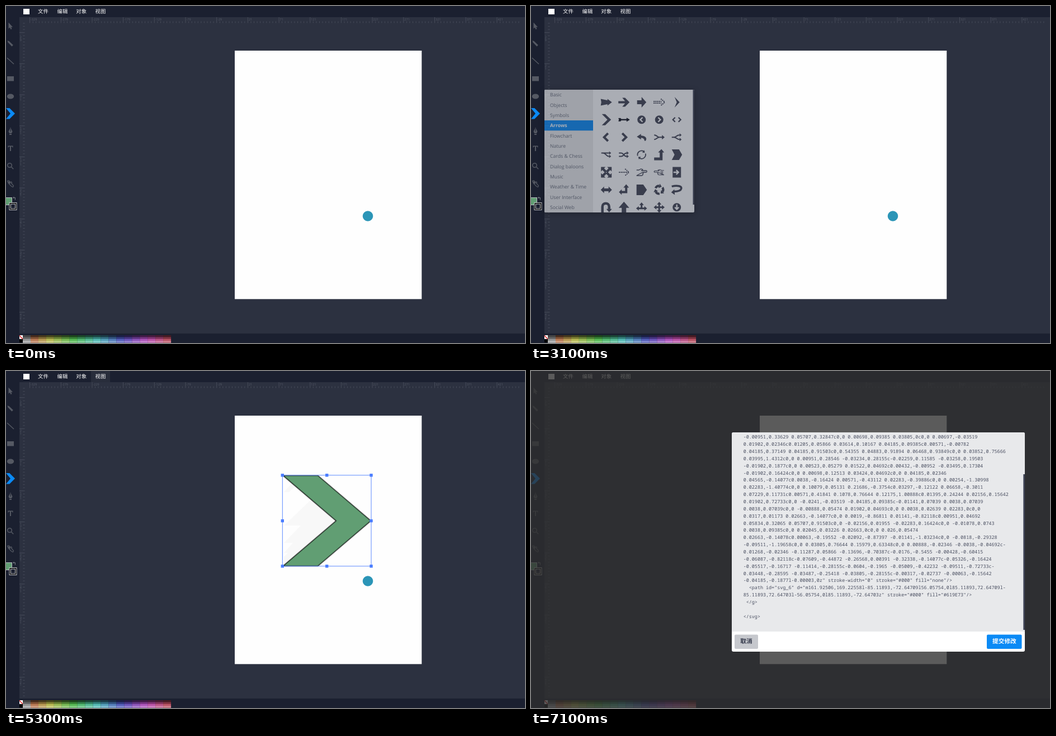
Recreate the animation shown at these times as an HTML page. Size 928 px wide and 604 px high, loop 8000 ms.

```html
<!DOCTYPE html>
<html lang="zh">
<head>
<meta charset="utf-8">
<title>Vector editor</title>
<style>
html, body { margin: 0; width: 100%; height: 100%; overflow: hidden; background: #1b2030; }
svg { display: block; width: 928px; height: 604px; }
text { font-family: "Open Sans", "Noto Sans", "Noto Sans CJK SC", "Noto Sans CJK", sans-serif; text-rendering: geometricPrecision; white-space: pre; }
.cjk { font-family: "Noto Sans CJK SC", "Noto Sans CJK", sans-serif; }
.code { font: 8.415px "Noto Sans Mono", "DejaVu Sans Mono", monospace; fill: #4a4f61; }
.tick { stroke: #4e5361; stroke-width: .8; fill: none; }
.mark { font-size: 5.5px; fill: #565b68; }
.cat { font-size: 8.7px; fill: #656b79; }
.tool { fill: #555963; }
.icon { color: #414555; stroke-width: 0; }
.key { font-size: 7.5px; font-weight: 600; fill: #4a5063; }
.row { font-size: 9.2px; fill: #5c6271; }

.a { animation: 8s step-end infinite; }
.panel { filter: drop-shadow(0 2px 6px rgba(0,0,0,.45)); animation-name: panel; }
.cat.h1 { animation-name: cat1; }
.cat.h2 { animation-name: cat2; }
.icon.h0 { animation-name: icon0; }
.icon.h5 { animation-name: icon5; }
.icon.h6 { animation-name: icon6; }
.shape { fill: #619e73; stroke: #000; stroke-width: 1.2; vector-effect: non-scaling-stroke; animation-name: drag; }
.trace { animation-name: trace; }
.select { animation-name: select; }
.hover { animation-name: hover; }
.menu { filter: drop-shadow(0 2px 4px rgba(0,0,0,.35)); animation-name: menu; }
.row.r0 { animation-name: row0; }
.row.r2 { animation-name: row2; }
.badge.r2 { animation-name: badge2; }
.badge.r0 { animation-name: badge0; }
.modal { animation-name: modal; }

@keyframes panel {
  0% { opacity: 0 } 17.5% { opacity: 1 } 37.5% { opacity: .925 }
  38.75% { opacity: .62 } 40% { opacity: .24 } 41.25%, 100% { opacity: 0 }
}
@keyframes cat2 { 21.25% { fill: #2b3040 } 22.5%, 100% { fill: #656b79 } }
@keyframes cat1 { 22.5% { fill: #2b3040 } 23.75%, 100% { fill: #656b79 } }
@keyframes icon0 { 23.75% { color: #10131f; stroke-width: .8px } 25%, 100% { color: #414555; stroke-width: 0 } }
@keyframes icon5 { 31.25% { color: #10131f; stroke-width: .8px } 32.5%, 100% { color: #414555; stroke-width: 0 } }
@keyframes icon6 { 32.5% { color: #10131f; stroke-width: .8px } 45%, 100% { color: #414555; stroke-width: 0 } }
@keyframes drag {
  0% { visibility: hidden; transform: translate(495.5px,187.5px) scale(1,1) }
  42.5% { visibility: visible; transform: translate(495.5px,187.5px) scale(38,30) }
  43.75% { transform: translate(495.5px,187.5px) scale(80,90) }
  45% { transform: translate(495.5px,187.5px) scale(104,121) }
  46.25% { transform: translate(495.5px,187.5px) scale(119,140) }
  47.5% { transform: translate(495.5px,187.5px) scale(128,149) }
  48.75% { transform: translate(495.5px,187.5px) scale(139,155) }
  50% { transform: translate(495.5px,187.5px) scale(146,159) }
  51.25% { transform: translate(495.5px,187.5px) scale(151,162) }
  53.75% { transform: translate(495.5px,187.5px) scale(155,162) }
  55%, 100% { visibility: visible; transform: translate(495.5px,187.5px) scale(157,162) }
}
@keyframes trace { 0% { opacity: 0 } 51.25%, 100% { opacity: 1 } }
@keyframes select { 0% { opacity: 0 } 58.75%, 100% { opacity: 1 } }
@keyframes hover { 0% { opacity: 0 } 66.25% { opacity: 1 } 78.75%, 100% { opacity: 0 } }
@keyframes menu { 0% { opacity: 0 } 78.75% { opacity: 1 } 86.25%, 100% { opacity: 0 } }
@keyframes row0 { 81.25% { fill: #10131f } 82.5%, 100% { fill: #5c6271 } }
@keyframes badge0 { 81.25% { fill: #bccdfa } 82.5%, 100% { fill: #dfe3e9 } }
@keyframes row2 { 0% { fill: #5c6271 } 82.5%, 100% { fill: #2b3040 } }
@keyframes badge2 { 0% { fill: #dfe3e9 } 82.5%, 100% { fill: #bccdfa } }
@keyframes modal { 0% { opacity: 0 } 86.25% { opacity: .3 } 87.5% { opacity: .7 } 88.75%, 100% { opacity: 1 } }
</style>
</head>
<body>
<svg id="stage" viewBox="0 0 928 604"></svg>
<script>
const range = n => [...Array(n).keys()];
const rect = (x, y, w, h, fill, more = '') => `<rect x="${x}" y="${y}" width="${w}" height="${h}" fill="${fill}" ${more}/>`;
const text = (x, y, str, more = '') => `<text x="${x}" y="${y}" ${more}>${str.replace(/&/g, '&amp;').replace(/</g, '&lt;')}</text>`;
const path = (d, more = '') => `<path d="${d}" ${more}/>`;
const group = (cls, body) => `<g class="${cls}">${body}</g>`;

// Rulers: 50 units are 55.7 px, the page starts at 409,80
const unit = 1.1137;
function rulers() {
  let ticks = '', labels = '';
  for (let v = -329; v < 460; v += 5) {
    const x = (409 + v * unit).toFixed(1), major = (v + 329) % 50 === 0;
    if (x < 928) ticks += `M${x} ${major ? 20 : 27.5}V30.5`;
    if (major && x < 900) labels += text(+x + 1.5, 25.5, String(v), 'class="mark"');
  }
  for (let v = -44; v < 455; v += 5) {
    const y = (80 + v * unit).toFixed(1), major = (v + 29) % 50 === 0;
    if (y > 30 && y < 584) ticks += `M${major ? 24 : 30.5} ${y}H33.5`;
    if (major) [...String(v)].forEach((c, i) => labels += text(24.8, +y + 6 + i * 4.6, c, 'class="mark"'));
  }
  return path(ticks, 'class="tick"') + labels;
}

function palette() {
  const light = [19, 36, 54, 68], grey = [27, 40, 60, 75];
  let out = rect(24, 590, 6, 7, '#fff') + path('M24 590.5L30 597', 'stroke="#d22" stroke-width="1.4"') + rect(24, 597, 6, 6, '#000');
  for (const r of range(4)) for (const c of range(19)) {
    const color = c ? `hsl(${22 + (c - 1) * 19.3} ${r > 2 ? 52 : 44}% ${light[r]}%)` : `hsl(0 0% ${grey[r]}%)`;
    out += rect(30 + c * 13.95, 590 + r * 3.4, 14, 3.5, color);
  }
  return out;
}

function toolbar() {
  const line = 'fill="none" stroke="#555963" stroke-width="1.5"';
  return group('tool',
    path('M4.500 29.500V40.500L7 38.500 8.500 42 10.500 41 9 37.800H12Z') +
    path('M2.500 62L5.500 63 12.800 70 10.500 72.500 3.500 65.300Z') +
    path('M2 93L14 104', line) + rect(2, 126, 12, 8.5, '#555963') +
    '<ellipse cx="8" cy="162" rx="6.200" ry="4.600"/>' +
    path('M8 217.500L11.500 225 10 228H6L4.500 225ZM6 229H10V231H6Z') +
    path('M8 219V225', 'stroke="#1b2030"') +
    path('M3.500 250.500H12.500V253.500H11.500L11 252H9V260H7V252H5L4.500 253.500H3.500Z') +
    '<circle cx="6.500" cy="285.500" r="3.800" ' + line + '/>' + path('M9.300 288.300L13.300 292.300', line) +
    path('M2.500 313.500L5 312.800 8 315.800 9.500 315 10.500 316.500 9.500 317.500 13.500 322 12.500 324.500 10 323.500 4.500 318Z', line.replace('1.5', '1.2')) +
    path('M4.500 315L7.500 318', 'stroke="#555963" stroke-width="3"')) +
    path('M0 183H6.300L16 192.700 6.300 202.500H0L8 192.700Z', 'fill="#0b8af5"') +
    rect(-1, 343.5, 11.5, 13, '#619e73', 'stroke="#b9bcc2"') +
    rect(6, 352.5, 13, 13, '#000', 'stroke="#c4c6cb"') + rect(8.5, 355, 8, 8, '#1b2030', 'stroke="#c4c6cb"') +
    path('M13 343.500H16.500V347.500M14.500 342L12.500 343.500 14.500 345', 'fill="none" stroke="#777b85"');
}

// Arrow icons, each about 20 px wide around its own centre
const fill = d => path(d, 'fill="currentColor" stroke="currentColor"');
const stroke = (d, w = 2, more = '') => path(d, `fill="none" stroke="currentColor" style="stroke-width:${w}px" ${more}`);
const cut = d => path(d, 'fill="none" stroke="#f8f9fc" style="stroke-width:2.3px"');
const head = (x, y, turn = 0, s = 4) => `<g transform="translate(${x} ${y}) rotate(${turn})">${fill(`M0 ${-s}L${s * 1.2} 0 0 ${s}Z`)}</g>`;
const spin = (turns, body) => turns.map(a => `<g transform="rotate(${a})">${body}</g>`).join('');
const disc = r => `<circle r="${r}" fill="currentColor"/>`;
const dots = 'stroke-dasharray="2 1.2"';
const corner = 'M-9 5H1V-4H-2L4 -10 9 -4H6V10H-9Z';
const hand = stroke('M-9 -4H-5L-1 -6 2 -5 0 -3H8C10 -3 10 0 8 0H2M2 0C4 1 3 3 2 3 3 4 2 6 0 6H-9Z', 1.3);
const icons = [
  fill('M-10 -6L2 -3.500V-6L10 0 2 6V3.500L-10 6 -9 0Z'),
  fill('M-10 -2H2L-3 -8H2L10 0 2 8H-3L2 2H-10Z'),
  fill('M-8 -3.500H0V-9.500L8.500 0 0 9.500V3.500H-8Z'),
  stroke('M-10 -1.500H4M-10 1.500H4M3 -6L10 0 3 6', 2, dots),
  fill('M-4 -9.500L5 0 -4 9.500 0 0Z'),
  fill('M-8 -10H-2L8.500 0 -2 10H-8L2 0Z'),
  fill('M-9.500 -2.500H-6L-5 -.8H5V-3L10 0 5 3V.8H-5L-6 2.500H-9.500L-8.500 0Z'),
  disc(7.5) + cut('M1.800 -4L-2.200 0 1.800 4'),
  disc(7.5) + cut('M-1.800 -4L2.200 0 -1.800 4'),
  stroke('M-3 -4L-7 0 -3 4M3 -4L7 0 3 4', 2.2),
  stroke('M3 -7L-4 0 3 7', 4),
  stroke('M-3 -7L4 0 -3 7', 4),
  fill('M-8.500 -1L-1 -6V-3C6 -3 10 1 8 5 7 7 5 7 5 5 4 2 2 1 -1 1V4Z'),
  stroke('M-9 -4C-4 -4 -4 0 0 0H6M-9 4C-4 4 -4 0 0 0') + head(5, 0),
  stroke('M-9 0H-5C0 0 -1 -4 5 -4M-5 0C0 0 -1 4 5 4') + head(5, -4, 0, 3) + head(5, 4, 0, 3),
  stroke('M-9 -3H5M-6 -3C0 -3 -1 3 5 3') + head(5, -3, 0, 3) + head(5, 3, 0, 3),
  stroke('M-9 -3H-5C0 -3 -1 3 5 3M-9 3H-5C0 3 -1 -3 5 -3') + head(5, -3, 0, 3) + head(5, 3, 0, 3),
  spin([0, 180], stroke('M-7 2A7.300 7.300 0 0 1 4 -6', 1.8) + head(3, -6, 35, 3)),
  fill(corner),
  fill('M-9 -9.500H4L9.500 0 4 9.500H-9L-4 0Z'),
  spin([0, 90, 180, 270], fill('M-9.500 -9.500H-1.500L-4 -7 1 -2 -2 1 -7 -4 -9.500 -1.500Z')),
  stroke('M-9 0H8M2 -6L9 0 2 6', 1.8, dots),
  hand,
  `<g transform="scale(-.95 .8)">${hand}</g>` + stroke('M2 -1H7M3 1H7M3 3H7', 1),
  fill('M-7.500 -9.500H7.500V9.500H-7.500Z') + cut('M-6 0H2M-1 -4L3 0 -1 4'),
  fill('M-10 0L-4 -6V-2.500H4V-6L10 0 4 6V2.500H-4V6Z'),
  fill('M-9 4L-4 -1V2H2V-4H-1L4 -10 9 -4H6V6H-4V9Z'),
  fill('M-9 -9.500H3L9.500 0 3 9.500H-9Z'),
  spin([0, 120, 240], stroke('M-6.500 -3A7.200 7.200 0 0 1 0 -7.200', 4) + head(0, -7, 18, 4)),
  stroke('M-9 -6C2 -9 9 -6 8 -2 7 2 0 3 -5 3', 3.5) + head(-4, 4, 175, 5),
  stroke('M-7 10V-1C-7 -9 5 -9 5 -1V4', 4.5) + head(5, 3, 90, 5),
  fill('M-9.500 1L0 -10 9.500 1H4V11H-4V1Z'),
  stroke('M-6 2H6M0 2V-5', 3) + head(-5, 2, 180, 4) + head(5, 2, 0, 4) + head(0, -4, -90, 4),
  spin([0, 90, 180, 270], stroke('M0 0H6', 3) + head(5, 0)),
  disc(7.5) + cut('M0 -5V2M-3.500 0L0 3.500 3.500 0')
];

const cats = ['Basic', 'Objects', 'Symbols', 'Arrows', 'Flowchart', 'Nature', 'Cards & Chess', 'Dialog baloons',
  'Music', 'Weather & Time', 'User Interface', 'Social Web'];

function panel() {
  const list = cats.map((name, i) => {
    const y = 162.4 + i * 18.34;
    return i === 3
      ? rect(24, 205, 87, 18.3, '#0b8af5') + text(34, y, name, 'class="cat" style="fill:#fff;font-weight:700"')
      : text(34, y, name, `class="cat a h${i}"`);
  }).join('');
  const grid = icons.map((body, i) =>
    `<g transform="translate(${134.7 + i % 5 * 31.5} ${172.4 + Math.floor(i / 5) * 31.4})"><g class="icon a h${i}">${body}</g></g>`).join('');
  return group('panel a', '<clipPath id="frame"><rect x="24" y="150" width="268" height="220" rx="2"/></clipPath><g clip-path="url(#frame)">' +
    rect(24, 150, 268, 220, '#f8f9fc') + rect(24, 150, 87, 220, '#e6e8ea') + list + grid +
    rect(289.5, 150, 2.5, 206, '#3f4456') + '</g>');
}

function drawing() {
  const handles = [494.3, 573.7, 653].flatMap(x => [186.8, 268.5, 349.8].map(y => [x, y]))
    .filter(([x, y]) => x !== 573.7 || y !== 268.5)
    .map(([x, y]) => rect(x - 2.7, y - 2.7, 5.4, 5.4, '#4a7dff')).join('');
  return path('M497 217H506L517 207 511 201ZM545 231L497 277H527L497 308H513L497 326H504L497 333V348L589 268.500Z', 'class="trace a" fill="#f8f8f8"') +
    path('M0 0H.397L1 .5 .397 1H0L.603 .5Z', 'class="shape a"') +
    group('select a', rect(494.3, 186.8, 158.7, 163, 'none', 'stroke="#4a7dff" stroke-width=".9"') + handles);
}

const title = (x, str, color = '#fff') => text(x, 13.4, str, `class="cjk" font-size="9.400" font-weight="500" fill="${color}"`);

function menu() {
  return group('hover a', rect(152, 0, 34, 20, '#282d3b') + title(159.6, '视图')) +
    group('menu a',
      path('M152 0H186V20H268.500Q272.500 20 272.500 24V95.500Q272.500 99.500 268.500 99.500H156Q152 99.500 152 95.500Z', 'fill="#f8f9fc"') +
      title(159.6, '视图', '#656b79') +
      rect(152, 70, 120.5, .8, '#e1e3e7') +
      text(155.5, 39.5, '✓', 'class="row" style="font-family:\'DejaVu Sans\',sans-serif;fill:#2b3040"') +
      text(167.5, 39.5, '显示刻度尺', 'class="row a r0"') +
      rect(247, 28, 20, 16, '#dfe3e9', 'rx="2" class="badge a r0"') +
      text(252, 39, '⇧R', 'class="key" style="font-family:\'Open Sans\',\'DejaVu Sans\',sans-serif"') +
      text(167.5, 60.3, '显示 Wireframe', 'class="row"') +
      text(167.5, 87.3, '源代码...', 'class="row a r2"') +
      rect(233, 76, 34, 16, '#dfe3e9', 'rx="2" class="badge a r2"') +
      text(238, 87, 'Ctrl+U', 'class="key" style="fill:#2b3040"'));
}

const code = `-0.00951,0.33629 0.05707,0.32847c0,0 0.00698,0.09385 0.03805,0c0,0 0.00697,-0.03519
0.01902,0.02346c0.01205,0.05866 0.03614,0.10167 0.04185,0.09385c0.00571,-0.00782
0.04185,0.37149 0.04185,0.91503c0,0.54355 0.04883,0.91894 0.06468,0.93849c0,0 0.03852,0.75666
0.03995,1.4312c0,0 0.00951,0.28546 -0.03234,0.28155c-0.02259,0.11585 -0.03258,0.19503
-0.01902,0.1877c0,0 0.00523,0.05279 0.01522,0.04692c0.00432,-0.00952 -0.03495,0.17304
-0.01902,0.16424c0,0 0.00698,0.12513 0.03424,0.04692c0,0 0.04185,0.02346
0.04565,-0.14077c0.0038,-0.16424 0.00571,-0.43112 0.02283,-0.39886c0,0 0.00254,-1.30998
0.02283,-1.40774c0,0 0.10079,0.05131 0.21686,-0.3754c0.03297,-0.12122 0.06658,-0.3011
0.07229,0.11731c0.00571,0.41841 0.1078,0.76644 0.12175,1.00888c0.01395,0.24244 0.02156,0.15642
0.01902,0.72733c0,0 -0.0241,-0.03519 -0.04185,0.09385c-0.01141,0.07039 0.0038,0.07039
0.0038,0.07039c0,0 -0.00888,0.05474 0.01902,0.04693c0,0 0.0038,0.02639 0.02283,0c0,0
0.0317,0.01173 0.02663,-0.14077c0,0 0.0019,-0.86811 0.01141,-0.82118c0.00951,0.04692
0.05834,0.32065 0.05707,0.91503c0,0 -0.02156,0.01955 -0.02283,0.16424c0,0 -0.01078,0.0743
0.0038,0.09385c0,0 0.02045,0.03226 0.02663,0c0,0 0.026,0.05474
0.02663,-0.14078c0.00063,-0.19552 -0.02092,-0.87397 -0.01141,-1.03234c0,0 -0.0818,-0.29328
-0.09511,-1.19658c0,0 0.03805,0.76644 0.15979,0.63348c0,0 0.00888,-0.02346 -0.0038,-0.04692c-
0.01268,-0.02346 -0.11287,0.05866 -0.13696,-0.70387c-0.0176,-0.5455 -0.00428,-0.60415
-0.06087,-0.82118c-0.07609,-0.44872 -0.26568,0.00391 -0.32338,-0.14077c-0.05326,-0.16424
-0.05517,-0.16717 -0.11414,-0.28155c-0.0604,-0.1965 -0.05009,-0.42232 -0.09511,-0.72733c-
0.03448,-0.28595 -0.03487,-0.25418 -0.03805,-0.28155c-0.00317,-0.02737 -0.00063,-0.15642
-0.04185,-0.1877l-0.00003,0z" stroke-width="0" stroke="#000" fill="none"/>
  <path id="svg_6" d="m161.92506,169.22558l-85.11893,-72.64709l56.05754,0l85.11893,72.64709l-
85.11893,72.64703l-56.05754,0l85.11893,-72.64703z" stroke="#000" fill="#619E73"/>
 </g>

</svg>`;

function modal() {
  const label = (x, str, color) => text(x, 488.4, str, `class="cjk" font-size="10.700" font-weight="700" fill="${color}"`);
  return group('modal a', rect(0, 0, 928, 604, '#2f2f2f', 'opacity=".79"') +
    rect(359, 110, 524, 393, '#fff', 'rx="3"') +
    path('M359 467V113Q359 110 362 110H880Q883 110 883 113V467Z', 'fill="#e8e9eb"') +
    code.split('\n').map((str, i) => text(379.7, 121.3 + i * 12.857, str, 'class="code"')).join('') +
    rect(880.3, 185, 2.7, 279, '#3f4456') +
    rect(364, 472.5, 42, 25.5, '#c6c8cd', 'rx="2"') + label(374.3, '取消', '#33384a') +
    rect(815, 472.5, 62.5, 25.5, '#0b8af5', 'rx="2"') + label(825, '提交修改', '#fff'));
}

document.getElementById('stage').innerHTML =
  rect(0, 0, 928, 604, '#1b2030') + rect(24, 20, 904, 567, '#2c3140') +
  rulers() + palette() + toolbar() +
  rect(31, 5, 11, 10, '#fff') +
  title(57, '文件') + title(91.5, '编辑') + title(125.3, '对象') + title(159.6, '视图') +
  rect(409, 80, 334.3, 445.3, '#fefefe') +
  '<circle cx="647" cy="376.500" r="9.300" fill="#2b95b7"/>' +
  drawing() + panel() + menu() + modal();
</script>
</body>
</html>
```
